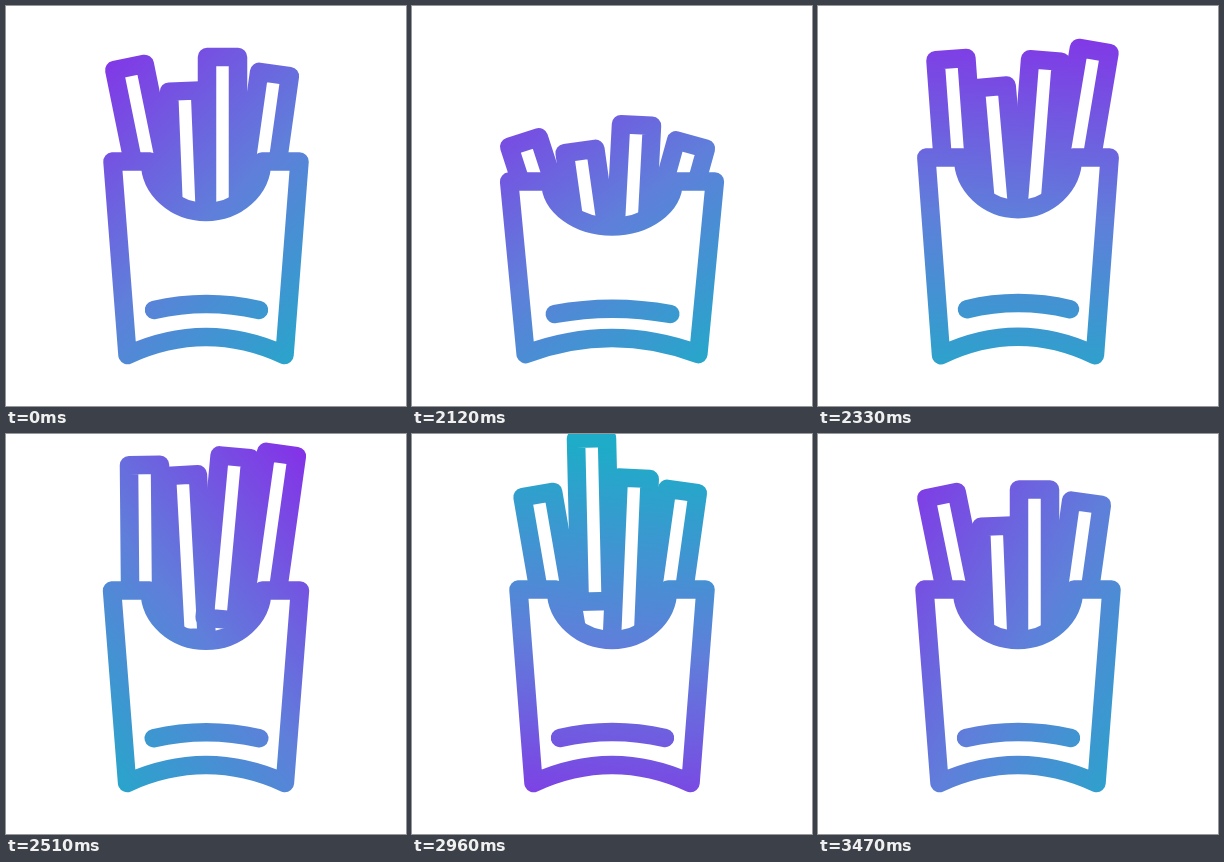
These frames come from a looping animation (400x400 px, 3500 ms). An HTML page with a canvas:

```html
<!DOCTYPE html>
<html lang="en">
<head>
<meta charset="utf-8">
<title>Fries</title>
<style>
  html, body { margin: 0; width: 100%; height: 100%; overflow: hidden; background: #fff; }
  canvas { display: block; width: 100vw; height: 100vh; }
</style>
</head>
<body>
<canvas id="stage" width="400" height="400"></canvas>
<script>
const ctx = document.getElementById('stage').getContext('2d');
const LOOP = 3500, START = 2000, STEP = 30;
const DIP = 120, SETTLE = 400;
const FRY_W = 31, FRY_L = 163, LINE = 18.5;

// rest is the top centre and tilt; dip and hop are offsets from it.
// peak and land are times after START, bounce is how deep the fry lands.
const fries = [
  { rest: [123.5, 61, -11.5], dip: [-11.5, 75, -6.5], hop: [15, -30, 11], peak: 508, land: 1110, bounce: 5 },
  { rest: [178.5, 85, -2.3], dip: [-10.5, 60, -5.7], hop: [1, -82, 1], peak: 930, land: 1330, bounce: 10 },
  { rest: [216.5, 51, 0], dip: [8, 68, 3], hop: [13, -38, 5.5], peak: 680, land: 1200, bounce: 18 },
  { rest: [268.5, 68, 8], dip: [10.5, 70.5, 7.5], hop: [7, -48, 0], peak: 505, land: 1200, bounce: 3 }
];

const carton = new Path2D('M106.5 155.5H144A56 50.5 0 0 0 256 155.5H293.5L278.5 349Q200 313 121.5 349Z');
const label = new Path2D('M148 304Q200 292 253 304');

const portion = (t, from, to) => Math.min(1, Math.max(0, (t - from) / (to - from)));
const smooth = p => p * p * (3 - 2 * p);
const slowing = p => p * (2 - p);
const mix = (a, b, p) => a.map((v, i) => v + (b[i] - v) * p);
const rad = deg => deg * Math.PI / 180;

// Duck, shoot up, fall a little too deep, settle
function offset(fry, t) {
  const still = [0, 0, 0], low = [0, fry.bounce, 0];
  if (t < DIP) return mix(still, fry.dip, smooth(portion(t, 0, DIP)));
  if (t < fry.peak) return mix(fry.dip, fry.hop, slowing(portion(t, DIP, fry.peak)));
  if (t < fry.land) return mix(fry.hop, low, smooth(portion(t, fry.peak, fry.land)));
  return mix(low, still, smooth(portion(t, fry.land, fry.land + SETTLE)));
}

function squash(t) {
  if (t < DIP) return .1 * smooth(portion(t, 0, DIP));
  const s = t - DIP;
  return .1 * Math.cos(Math.PI * s / 200) * Math.exp(-s / 130);
}

function paint(t) {
  const a = rad(45 + 360 * smooth(portion(t, 0, 1700) ** .9));
  const x = 195 * Math.cos(a), y = 195 * Math.sin(a);
  const g = ctx.createLinearGradient(204 - x, 211 - y, 204 + x, 211 + y);
  ['#8433e7', '#5f7fda', '#1eacc8'].forEach((color, i) => g.addColorStop(i / 2, color));
  return g;
}

function placed(shape, matrix) {
  const path = new Path2D();
  path.addPath(shape, matrix);
  return path;
}

function fryPath(fry, t) {
  const [x, y, tilt] = offset(fry, t).map((v, i) => v + fry.rest[i]);
  const shape = new Path2D();
  shape.rect(-FRY_W / 2, 0, FRY_W, FRY_L);
  return placed(shape, new DOMMatrix().translate(x, y).rotate(tilt));
}

function draw(t) {
  ctx.fillStyle = '#fff';
  ctx.fillRect(0, 0, 400, 400);
  ctx.strokeStyle = paint(t);
  ctx.lineWidth = LINE;
  ctx.lineJoin = ctx.lineCap = 'round';
  for (const fry of fries) ctx.stroke(fryPath(fry, t));

  const k = squash(t);
  const press = new DOMMatrix().translate(200, 341).scale(1 + k, 1 - 1.08 * k).translate(-200, -341);
  const front = placed(carton, press);
  ctx.fill(front);
  ctx.stroke(front);
  ctx.stroke(placed(label, press));
}

const origin = performance.now();
function tick() {
  const t = (performance.now() - origin) % LOOP - START;
  draw(Math.max(0, Math.floor(t / STEP) * STEP));
  requestAnimationFrame(tick);
}
tick();
</script>
</body>
</html>
```
